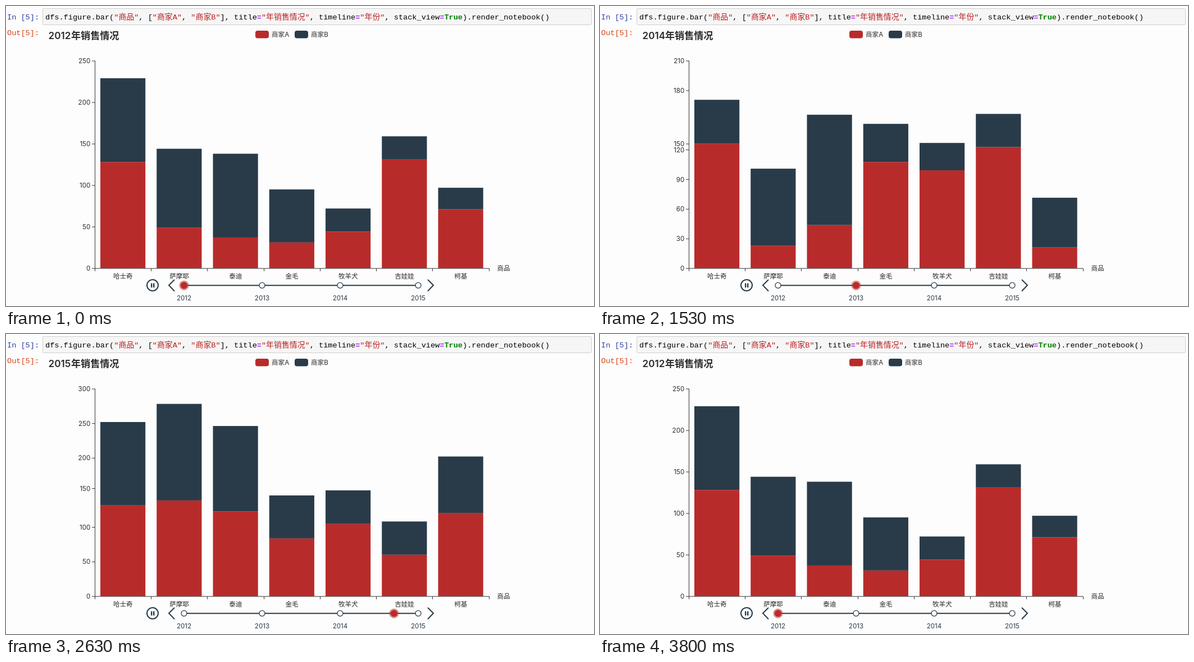
Animation of 1047 by 535 pixels, one loop 3.86 s. Source, as an HTML page:

```html
<!DOCTYPE html>
<html lang="zh">
<head>
<meta charset="utf-8">
<style>
  html, body { margin: 0; width: 100%; height: 100%; overflow: hidden; background: #fdfdfd; }
  svg { display: block; font: 11.6px Inter, "Noto Sans CJK SC", "Noto Sans CJK", sans-serif; fill: #2b2b2b; }
  .code { font: 13.58px "Liberation Mono", "Noto Sans CJK SC", "Noto Sans CJK", monospace; white-space: pre; fill: #000; }
  .code .cjk { font-size: 13.9px; }
  .code .str { fill: #ba2121; }
  .code .op { fill: #aa22ff; font-weight: bold; }
  .code .kw { fill: #008000; font-weight: bold; }
  .title { font-size: 17.1px; font-weight: 600; }
  .mid { text-anchor: middle; }
  .end { text-anchor: end; }
  .red { fill: #b82b2b; }
  .dark { fill: #293b49; }
  .line { fill: none; stroke: #293b49; stroke-width: 2; }
  .axis { fill: none; stroke: #333; }
</style>
</head>
<body>
<svg width="1047" height="535" viewBox="0 0 1047 535">
  <rect x="65.5" y="4.5" width="977" height="29" rx="2" fill="#f6f6f6" stroke="#cfcfcf"/>
  <text class="code" x="2" y="24" style="fill:#303f9f">In [5]:</text>
  <text class="code" x="2" y="52" style="fill:#d84315">Out[5]:</text>
  <text class="code" x="70" y="24" id="code"></text>

  <text class="title" x="75.5" y="59" id="year"></text>
  <text class="title" x="116" y="59">年销售情况</text>
  <rect class="red" x="444" y="44" width="24" height="13.5" rx="4"/>
  <text x="473" y="55">商家A</text>
  <rect class="dark" x="514" y="44" width="24" height="13.5" rx="4"/>
  <text x="543" y="55">商家B</text>

  <g id="bars"></g>
  <g id="scale"></g>
  <g id="categories"></g>
  <path class="axis" d="M158.5 97.5V468M158 468H860.5"/>
  <text x="874.5" y="472">商品</text>

  <g class="line">
    <circle cx="261" cy="498" r="10"/>
    <path d="M259.2 494.5v7.5M263.2 494.5v7.5" stroke-width="2.4"/>
    <path d="M300 488L290 498L300 508.5M751 488L761 498L751 508.5M317 498.2H734"/>
  </g>
  <g id="stops"></g>
  <circle class="red" id="pointer" cy="498.2" r="6.3" stroke="#c23531" stroke-opacity=".5" stroke-width="4.8"/>
</svg>
<script>
const BASE = 467.7, HEIGHT = 370, PITCH = 100.25, LOOP = 3860, STEP = 1000 / 30;
const $ = id => document.getElementById(id);

// "low" is the height of the red part, "total" that of the whole stack.
const years = [
  { name: 2012, max: 250, tick: 50, low: [128, 49, 37, 31, 44, 131, 71], total: [229, 144, 138, 95, 72, 159, 97] },
  { name: 2013, max: 250, tick: 50, low: [150, 27, 52, 128, 118, 146, 25], total: [203, 120, 185, 174, 151, 186, 85] },
  { name: 2014, max: 210, tick: 30, low: [121, 134, 105, 48, 43, 109, 81], total: [149, 189, 187, 94, 81, 144, 115] },
  { name: 2015, max: 300, tick: 50, low: [127, 133, 120, 85, 109, 50, 121], total: [256, 279, 244, 147, 157, 98, 206] }
];
// Start and length of each change, in steps of 1/30 s.
const moves = [[13, 9], [46, 6.5], [76, 5.5], [107, 7]];

const lerp = (a, b, p) => a + (b - a) * p;
const cubicOut = p => 1 - (1 - p) ** 3;
const quinticInOut = p => p < .5 ? 16 * p ** 5 : 1 - 16 * (1 - p) ** 5;
const stopX = i => 317 + 139 * i;

const source = 'dfs.figure.bar("商品", ["商家A", "商家B"], title="年销售情况", timeline="年份", stack_view=True).render_notebook()';
const tag = (name, text) => `<tspan class="${name}">${text}</tspan>`;
$('code').innerHTML = source.split(/("[^"]*"|=|True)/).map(part =>
  part[0] === '"' ? tag('str', part.replace(/[\u4e00-\u9fff]+/g, s => tag('cjk', s))) :
  part === '=' ? tag('op', part) :
  part === 'True' ? tag('kw', part) : part).join('');

$('categories').innerHTML = ['哈士奇', '萨摩耶', '泰迪', '金毛', '牧羊犬', '吉娃娃', '柯基'].map((name, i) =>
  `<text class="mid" x="${208.3 + PITCH * i}" y="486">${name}</text>`).join('') +
  Array.from({ length: 8 }, (_, i) =>
    `<path class="axis" d="M${Math.floor(158.3 + PITCH * i) + .5} 468v5"/>`).join('');

$('stops').innerHTML = years.map(({ name }, i) =>
  `<circle cx="${stopX(i)}" cy="498.2" r="5" fill="#fff" stroke="#293b49" stroke-width="1.3"/>
   <text class="mid dark" x="${stopX(i)}" y="524.7">${name}</text>`).join('');

function bar(cls, i, top, bottom) {
  return `<rect class="${cls}" x="${168 + PITCH * i}" y="${BASE - top}" width="80.2" height="${top - bottom}"/>`;
}

function draw(step) {
  const last = moves.filter(([start]) => step >= start).length - 1;
  const to = years[(last + 1) % 4], from = years[(last + 4) % 4];
  const p = last < 0 ? 1 : Math.min(1, (step - moves[last][0]) / moves[last][1]);
  const eased = cubicOut(p);
  const size = (key, i) => HEIGHT * lerp(from[key][i] / from.max, to[key][i] / to.max, eased);

  $('year').textContent = to.name;
  $('bars').innerHTML = to.low.map((_, i) => {
    const low = size('low', i);
    return bar('dark', i, size('total', i), low) + bar('red', i, low, 0);
  }).join('');

  // Values already on the old scale slide; new ones appear in place.
  let marks = '';
  for (let v = 0; v <= to.max; v += to.tick) {
    const shared = v % from.tick === 0 && v <= from.max;
    const y = 468 - HEIGHT * v * lerp(1 / (shared ? from : to).max, 1 / to.max, eased);
    marks += `<path class="axis" d="M153 ${y}h5"/><text class="end" x="150.3" y="${y + 4.1}">${v}</text>`;
  }
  $('scale').innerHTML = marks;
  $('pointer').setAttribute('cx', lerp(stopX(years.indexOf(from)), stopX(years.indexOf(to)), quinticInOut(p)));
}

const begin = performance.now();
let shown = -1;
function play() {
  const step = Math.floor(((performance.now() - begin) % LOOP + 4) / STEP);
  if (step !== shown) draw(shown = step);
  requestAnimationFrame(play);
}
play();
</script>
</body>
</html>
```
